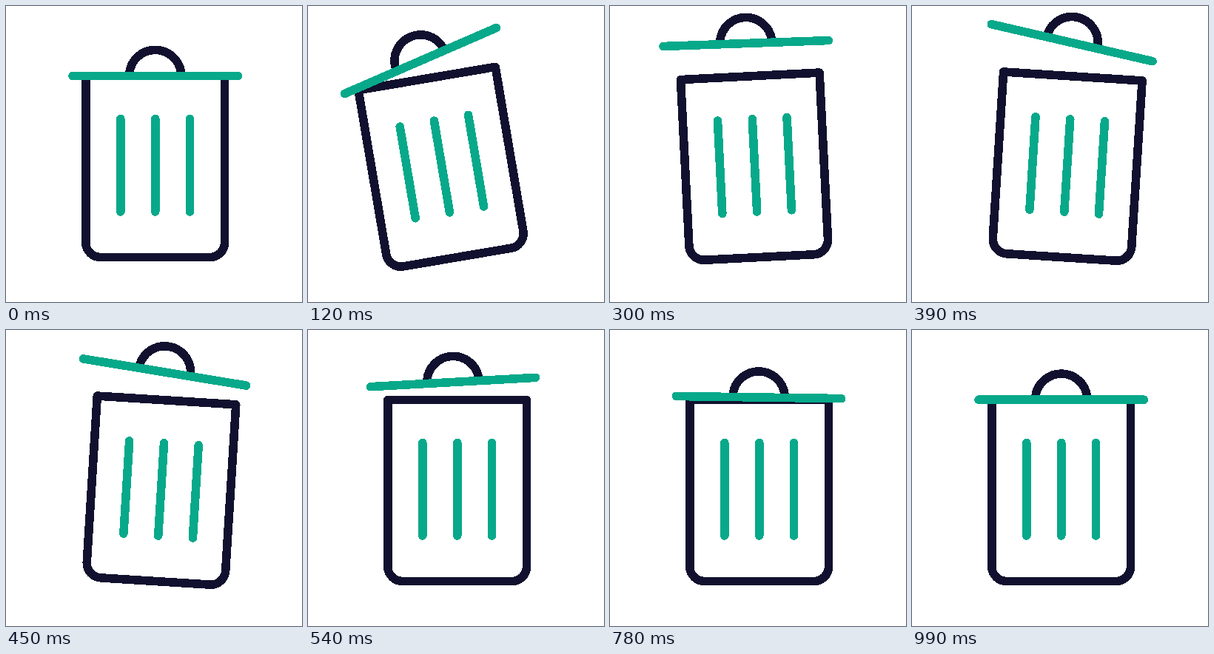
An HTML page that plays this animation: 400 px wide and 400 px high, repeating every 1.02 s.

```html
<!DOCTYPE html>
<html lang="en">
<head>
<meta charset="utf-8">
<title>Bin wobble</title>
<style>
  html, body { margin: 0; width: 100%; height: 100%; overflow: hidden; background: #fff; }
  svg { display: block; width: 100%; height: 100%; fill: none; stroke-width: 11.6; stroke-linejoin: round; shape-rendering: crispEdges; }
  .navy { stroke: #11112f; }
  .green { stroke: #07a98a; stroke-linecap: round; }
</style>
</head>
<body>
<svg viewBox="0 0 400 400">
  <g id="bin">
    <path class="navy" d="M107.8 94.5H295.6V319.5A20 20 0 0 1 275.6 339.5H127.8A20 20 0 0 1 107.8 319.5Z"/>
    <path class="green" d="M154.9 152.5V278M201.8 152.5V278M248.6 152.5V278"/>
    <g id="lid">
      <path class="navy" d="M-34.9 -4.5A35.2 35.2 0 0 1 34.9 -4.5"/>
      <path class="green" d="M-111.7 0H111.7"/>
    </g>
  </g>
</svg>
<script>
const LOOP = 1020, STEP = 30;
const bin = document.getElementById('bin');
const lid = document.getElementById('lid');

const kick = u => 1 - (1 - u) ** 3;
const swing = u => (1 - Math.cos(Math.PI * u)) / 2;

// A sharp kick from rest to the first pose, then swings between the others.
const wobble = (...poses) => t => {
  let t0 = 0, v0 = 0, ease = kick;
  for (const [t1, v1] of poses) {
    if (t < t1) return v0 + (v1 - v0) * ease((t - t0) / (t1 - t0));
    [t0, v0, ease] = [t1, v1, swing];
  }
  return v0;
};

const sway = wobble([180, -10], [420, 4.2], [540, 0]);
const tilt = wobble([170, -14.2], [390, 9.3], [560, -3.6], [780, 0.8], [990, 0]);
const shift = wobble([120, -4.4], [300, -3.3], [540, -5.7], [850, 0]);

// The lid is thrown up ballistically, then settles softly.
const TOP = 46.2, PEAK = 370;
const lift = t => TOP * (t < PEAK
  ? 1 - (1 - t / PEAK) ** 2
  : Math.exp(-(((t - PEAK) / 223) ** 1.56)));

function draw(now) {
  const t = Math.floor((now % LOOP) / STEP) * STEP;
  bin.setAttribute('transform', `rotate(${sway(t)} 202 340)`);
  lid.setAttribute('transform',
    `translate(${201.7 + shift(t)} ${94.5 - lift(t)}) rotate(${tilt(t)})`);
}

const start = performance.now();
function tick() {
  draw(performance.now() - start);
  requestAnimationFrame(tick);
}
tick();
</script>
</body>
</html>
```
